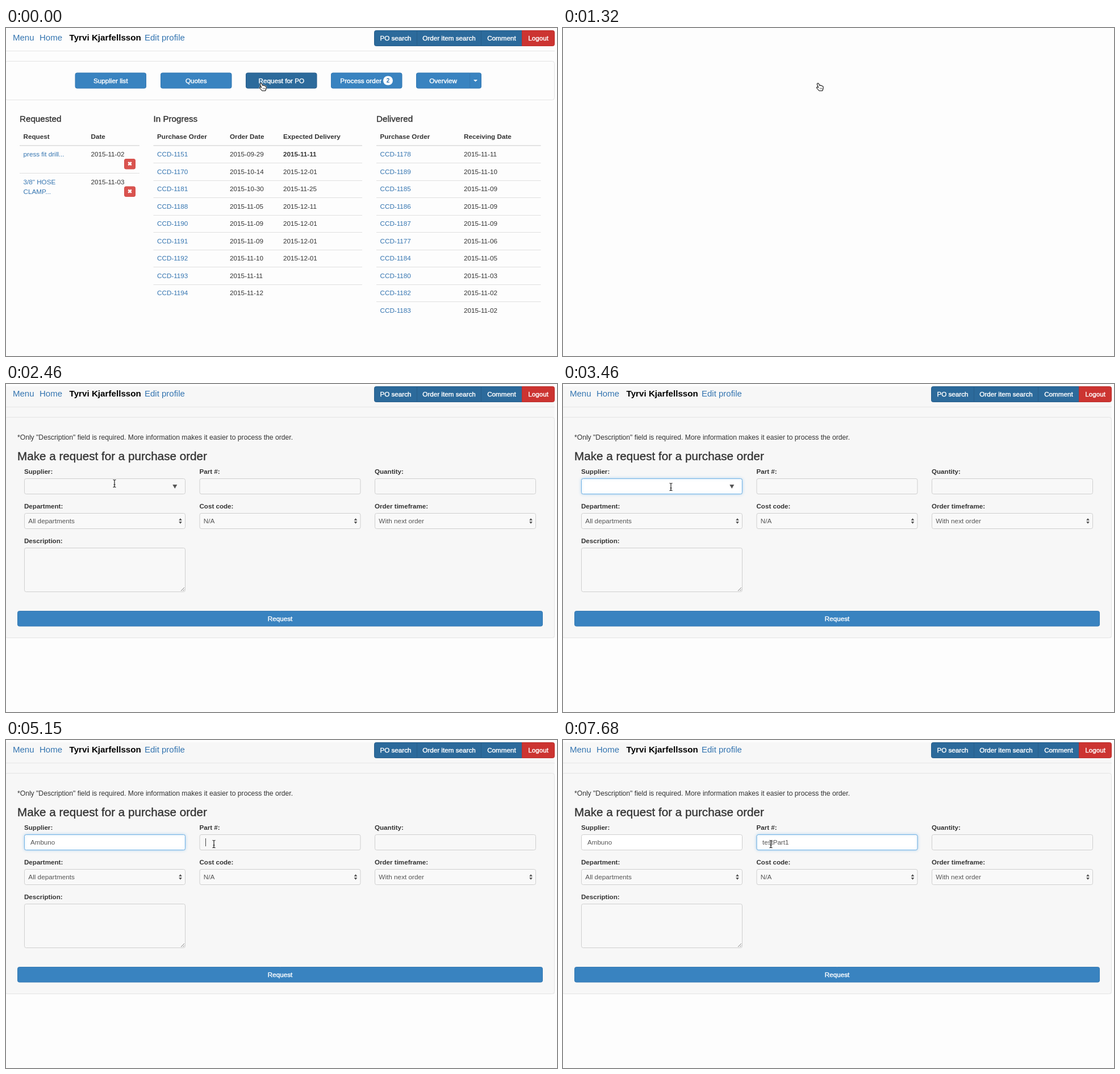
Write an HTML page with a canvas that moves like this. It is 970 by 577 pixels and loops after 8000 ms.

```html
<!DOCTYPE html>
<html lang="en">
<head>
<meta charset="utf-8">
<title>Purchase order request</title>
<style>
html, body { margin: 0; width: 100%; height: 100%; overflow: hidden; background: #fdfdfd; }
canvas { display: block; }
</style>
</head>
<body>
<canvas id="stage" width="970" height="577"></canvas>
<script>
const ctx = document.getElementById('stage').getContext('2d');
const LOOP = 8000;
const SANS = '"Liberation Sans", Arial, sans-serif';
const MENU_FONT = 'Inter, sans-serif';
const INK = '#333', LINK = '#3374b0', PAPER = '#fdfdfd', PANEL = '#f7f7f7';
const BLUE = { fill: '#3983c0', edge: '#3579b3' };
const NAVY = { fill: '#2c6a9b', edge: '#265d8a' };
const PRESSED = { fill: '#275d8b', edge: '#1f4d74' };
const RED = { fill: '#cc3431', edge: '#bb2f2c' };

const SUPPLIERS = ['Ambuno', 'AVOK Bindings', 'Arvend Transistors', 'Atlu Inc.',
  'Aldwyker Event Hall Services', 'Ambuno', 'AVOK Bindings'];

const IN_PROGRESS = [
  ['1151', '09-29', '11-11'], ['1170', '10-14', '12-01'], ['1181', '10-30', '11-25'],
  ['1188', '11-05', '12-11'], ['1190', '11-09', '12-01'], ['1191', '11-09', '12-01'],
  ['1192', '11-10', '12-01'], ['1193', '11-11'], ['1194', '11-12']];
const DELIVERED = [
  ['1178', '11-11'], ['1189', '11-10'], ['1185', '11-09'], ['1186', '11-09'], ['1187', '11-09'],
  ['1177', '11-06'], ['1184', '11-05'], ['1180', '11-03'], ['1182', '11-02'], ['1183', '11-02']];

// time, x, y, cursor shape from that time on
const POINTER = [
  [0, 452, 104, 'hand'], [1430, 374, 135, 'hand'], [1580, 374, 135, 'arrow'],
  [1900, 290, 143, 'arrow'], [2160, 225, 153, 'arrow'],
  [2280, 196, 170, 'beam'], [2340, 193, 173, 'beam'], [2460, 191, 175, 'beam'],
  [2930, 191, 175, 'beam'], [3110, 190, 181, 'beam'], [3990, 190, 181, 'beam'],
  [4050, 182, 197, 'arrow'], [4110, 174.5, 207, 'arrow'], [4530, 174.5, 207, 'arrow'],
  [4700, 240, 209, 'arrow'], [4820, 330, 192, 'arrow'], [4870, 350, 187, 'beam'],
  [4920, 366, 183, 'beam'], [LOOP, 366, 183, 'beam']];

const TYPING = [[6030, 'te'], [6115, 'tes'], [6200, 'test'], [6440, 'testP'],
  [6610, 'testPa'], [6700, 'testPar'], [6790, 'testPart'], [7200, 'testPart1']];

const HAND = new Path2D('M-4-6.5Q-2.5-7.5-1.5-5.5L-.5-3Q1-4 2-2.5Q3.5-3.3 4.3-1.8Q6-2 6.2 0' +
  'L6 3L4.5 6.5H-1L-5.5 1.5Q-6-.5-3.5 0L-2.5.8L-4.7-5Q-4.9-6-4-6.5Z');
const ARROW = new Path2D('M0 0V12L2.8 9.4L4.8 14L6.8 13.1L4.8 8.7H8.6Z');
const BEAM = new Path2D('M-2.5-6.5Q0-6.5 0-5V5Q0 6.5-2.5 6.5M2.5-6.5Q0-6.5 0-5M2.5 6.5Q0 6.5 0 5M-1.5 2H1.5');

const between = (t, a, b) => t >= a && t < b;
const ramp = (t, a, b) => Math.min(1, Math.max(0, (t - a) / (b - a)));

function text(str, x, y, { size = 11.7, color = INK, bold = false, medium = 0, align = 'left', font = SANS } = {}) {
  ctx.font = `${bold ? 'bold ' : ''}${size}px ${font}`;
  ctx.textAlign = align;
  ctx.fillStyle = color;
  ctx.fillText(str, x, y);
  if (medium) {
    ctx.strokeStyle = color;
    ctx.lineWidth = medium;
    ctx.strokeText(str, x, y);
  }
}

function box(x, y, w, h, fill, edge, radius = 3) {
  ctx.beginPath();
  ctx.roundRect(x + 0.5, y + 0.5, w - 1, h - 1, radius);
  ctx.fillStyle = fill;
  ctx.fill();
  ctx.strokeStyle = edge;
  ctx.lineWidth = 1;
  ctx.stroke();
}

function rule(x, y, w, color = '#e0e0e0', h = 1) {
  ctx.fillStyle = color;
  ctx.fillRect(x, Math.round(y), w, h);
}

function polygon(color, ...points) {
  ctx.beginPath();
  points.forEach(([x, y]) => ctx.lineTo(x, y));
  ctx.fillStyle = color;
  ctx.fill();
}

function button(label, x, y, w, h, skin, { radius = 3, shift = 0 } = {}) {
  box(x, y, w, h, skin.fill, skin.edge, radius);
  text(label, x + w / 2 + shift, y + h / 2 + 4, { color: '#fff', medium: 0.4, align: 'center' });
}

function heading(str, x, y, size = 15.2) {
  text(str, x, y, { size, medium: 0.35 });
}

function header() {
  const link = { size: 15, color: LINK };
  text('Menu', 12, 22, link);
  text('Home', 59, 22, link);
  text('Tyrvi Kjarfellsson', 111.5, 22, { size: 15.2, color: '#000', bold: true });
  text('Edit profile', 244, 22, link);
  rule(0, 40, 966, '#e6e6e6');
  button('PO search', 648, 4, 76, 28, NAVY, { radius: [3, 0, 0, 3] });
  button('Order item search', 723, 4, 114, 28, NAVY, { radius: 0 });
  button('Comment', 836, 4, 73, 28, NAVY, { radius: 0 });
  button('Logout', 908, 4, 58, 28, RED, { radius: [0, 3, 3, 0] });
}

function removeButton(y) {
  box(208, y, 20, 18.5, '#d9534f', '#d54c48', 2.5);
  ctx.beginPath();
  ctx.moveTo(215.3, y + 6); ctx.lineTo(220.7, y + 11.4);
  ctx.moveTo(220.7, y + 6); ctx.lineTo(215.3, y + 11.4);
  ctx.strokeStyle = '#fff';
  ctx.lineWidth = 2.6;
  ctx.stroke();
}

function orderTable(title, x, w, heads, rows) {
  heading(title, x, 165);
  heads.forEach(([label, hx]) => text(label, hx, 195, { bold: true }));
  rule(x, 206, w, '#dcdcdc', 1.5);
  rows.forEach(([order, ...dates], i) => {
    const y = 226.3 + i * 30.5;
    if (i) rule(x, 206.5 + i * 30.5, w);
    text('CCD-' + order, heads[0][1], y, { color: LINK });
    dates.forEach((date, j) =>
      text('2015-' + date, heads[j + 1][1], y, { bold: i === 0 && j === 1 }));
  });
}

function overviewPage(t) {
  header();
  box(-2, 58, 968, 69, PAPER, '#e4e4e4', 4);
  button('Supplier list', 121.5, 78.5, 125.5, 28, BLUE);
  button('Quotes', 272, 78.5, 125.5, 28, BLUE);

  const clicked = t >= 390;
  if (clicked) {
    ctx.save();
    ctx.shadowColor = '#5c9fe0';
    ctx.shadowBlur = 3;
    box(421, 77.5, 127, 30, '#7fb2e3', '#7fb2e3', 4);
    ctx.restore();
  }
  button('Request for PO', 422, 78.5, 125.5, 28, clicked ? PRESSED : NAVY);

  button('Process order', 572, 78.5, 125.5, 28, BLUE, { shift: -10 });
  ctx.beginPath();
  ctx.roundRect(664, 84.5, 17, 16, 8);
  ctx.fillStyle = '#fff';
  ctx.fill();
  text('2', 672.5, 96, { size: 10, bold: true, color: LINK, align: 'center' });
  button('Overview', 722, 78.5, 95, 28, BLUE, { radius: [3, 0, 0, 3] });
  button('', 816, 78.5, 21, 28, BLUE, { radius: [0, 3, 3, 0] });
  polygon('#fff', [823, 91], [830, 91], [826.5, 94.5]);

  heading('Requested', 24, 165);
  text('Request', 30.5, 195, { bold: true });
  text('Date', 149.5, 195, { bold: true });
  rule(24, 206, 211, '#dcdcdc', 1.5);
  text('press fit drill...', 30.5, 226.3, { color: LINK });
  text('2015-11-02', 149.5, 226.3);
  removeButton(230);
  rule(24, 255, 211);
  text('3/8" HOSE', 30.5, 275, { color: LINK });
  text('CLAMP...', 30.5, 291.5, { color: LINK });
  text('2015-11-03', 149.5, 275);
  removeButton(278.5);

  orderTable('In Progress', 259.5, 367.5,
    [['Purchase Order', 266], ['Order Date', 394], ['Expected Delivery', 488]], IN_PROGRESS);
  orderTable('Delivered', 652, 289.5,
    [['Purchase Order', 658.5], ['Receiving Date', 806]], DELIVERED);
}

function input(label, x, y, h = 28, { focus = 0, fill = '#f8f8f8' } = {}) {
  text(label, x, y - 8.3, { bold: true, size: 11.6 });
  box(x, y, 284, h, fill, '#cfcfcf');
  if (focus > 0) {
    ctx.save();
    ctx.globalAlpha = focus;
    ctx.shadowColor = 'rgba(102,175,233,.45)';
    ctx.shadowBlur = 5;
    box(x, y, 284, h, '#fff', '#72b3e6');
    ctx.restore();
  }
}

function select(label, value, x) {
  input(label, x, 227, 28, { fill: '#f9f9f9' });
  text(value, x + 7.3, 245.2, { color: '#555', size: 11.75 });
  const cx = x + 275;
  polygon('#555', [cx - 2.8, 240], [cx + 2.8, 240], [cx, 236]);
  polygon('#555', [cx - 2.8, 242], [cx + 2.8, 242], [cx, 246]);
}

function typed(str, x, caret) {
  text(str, x, 184.2, { color: '#555', size: 11.6 });
  if (caret) {
    const end = str ? x + ctx.measureText(str).width : x;
    rule(Math.round(end), 173, 1, '#444', 14);
  }
}

function suggestions(highlighted) {
  ctx.fillStyle = '#fff';
  ctx.fillRect(32, 194, 284, 141);
  if (highlighted) rule(33, 195, 282, '#b0d5fc', 20);
  ctx.strokeStyle = '#8fbfe9';
  ctx.lineWidth = 1;
  ctx.strokeRect(32.5, 194.5, 283, 140);
  rule(33, 294, 282, '#dfdfdf');
  SUPPLIERS.forEach((name, i) =>
    text(name, 36, 209.7 + i * 19.9 + (i > 4 ? 0.7 : 0), { color: '#000', size: 10.9, font: MENU_FONT }));
}

function formPage(t) {
  ctx.fillStyle = PANEL;
  ctx.fillRect(0, 4, 966, 443);
  header();
  box(-2, 58, 968, 389, PANEL, '#e4e4e4', 4);
  text('*Only "Description" field is required. More information makes it easier to process the order.',
    20, 97.5, { size: 12.15 });
  heading('Make a request for a purchase order', 20, 133.7, 20.65);

  const supplierFocus = t < 5150 ? ramp(t, 2880, 3110) : 1 - ramp(t, 5200, 5320);
  const partFocus = ramp(t, 5200, 5320);
  input('Supplier:', 32, 166, 28, { focus: supplierFocus, fill: t >= 2930 ? '#fff' : '#f8f8f8' });
  input('Part #:', 340.5, 166, 28, { focus: partFocus });
  input('Quantity:', 649, 166);
  select('Department:', 'All departments', 32);
  if (t >= 1640) select('Cost code:', 'N/A', 340.5);
  select('Order timeframe:', 'With next order', 649);

  input('Description:', 32, 288, 78);
  ctx.beginPath();
  ctx.moveTo(308, 364); ctx.lineTo(314, 358);
  ctx.moveTo(311.5, 364); ctx.lineTo(314, 361.5);
  ctx.strokeStyle = '#777';
  ctx.lineWidth = 0.9;
  ctx.stroke();
  button('Request', 20, 399, 925, 27.5, BLUE);

  if (between(t, 2280, 4820)) polygon('#555', [293.3, 177], [301.3, 177], [297.3, 184]);

  const supplier = t < 3760 ? '' : t < 4530 ? 'a' : SUPPLIERS[0];
  typed(supplier, 43, between(t, 2930, 3460) || between(t, 3760, 5150));
  const part = TYPING.reduce((now, [at, str]) => (t >= at ? str : now), '');
  typed(part, 351, between(t, 5150, 5790) || between(t, 6030, 7680));

  if (between(t, 3760, 4530)) suggestions(t >= 4050);
}

function outlined(path, halo, line) {
  ctx.lineJoin = 'round';
  ctx.strokeStyle = halo;
  ctx.lineWidth = 2.2;
  ctx.stroke(path);
  ctx.strokeStyle = line;
  ctx.lineWidth = 1.1;
}

function pointer(t) {
  const i = POINTER.findLastIndex(key => t >= key[0]);
  const [t0, x0, y0, shape] = POINTER[i];
  const [t1, x1, y1] = POINTER[i + 1];
  // the hand stays put; a page change moves it at once
  const k = shape === 'hand' ? 0 : (t - t0) / (t1 - t0);
  ctx.save();
  ctx.translate(x0 + (x1 - x0) * k, y0 + (y1 - y0) * k);
  if (shape === 'hand') {
    outlined(HAND, 'rgba(255,255,255,.7)', '#111');
    ctx.fillStyle = '#fff';
    ctx.fill(HAND);
    ctx.stroke(HAND);
    ctx.fillStyle = '#555';
    for (let j = 0; j < 3; j++) ctx.fillRect(0.2 + j * 1.7, 1.2, 0.7, 2.8);
  } else if (shape === 'arrow') {
    outlined(ARROW, '#fff', '#fff');
    ctx.fillStyle = '#000';
    ctx.fill(ARROW);
  } else {
    outlined(BEAM, 'rgba(255,255,255,.7)', '#111');
    ctx.stroke(BEAM);
  }
  ctx.restore();
}

function draw(now) {
  const t = now % LOOP;
  ctx.fillStyle = PAPER;
  ctx.fillRect(0, 0, 970, 577);
  if (t < 1320) overviewPage(t);
  else if (t >= 1430) formPage(t);
  pointer(t);
}

let start;
function tick(now) {
  start ??= now;
  draw(now - start);
  requestAnimationFrame(tick);
}
draw(0);
requestAnimationFrame(tick);
</script>
</body>
</html>
```
